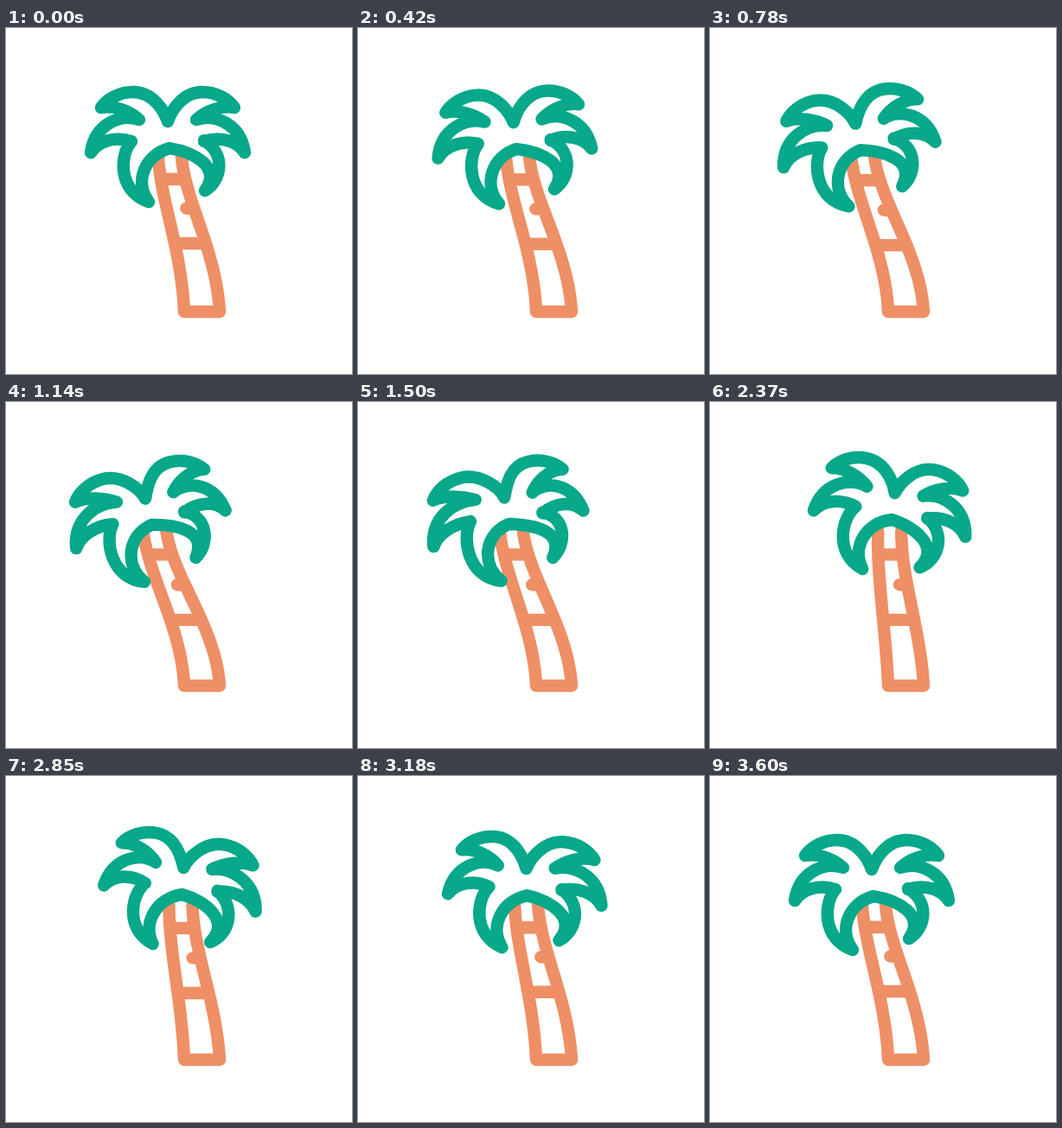
These frames come from a looping animation (400x400 px, 5630 ms). An HTML page:

```html
<!DOCTYPE html>
<html lang="en">
<head>
<meta charset="utf-8">
<title>Palm in the wind</title>
<style>
  html, body { margin: 0; width: 100%; height: 100%; overflow: hidden; background: #fff; }
  svg { display: block; width: 100%; height: 100%; }
  path { fill: none; stroke-width: 14.4; stroke-linecap: round; stroke-linejoin: round; }
</style>
</head>
<body>
<svg viewBox="0 0 400 400">
  <path id="trunk" stroke="#ee8f66"/>
  <path id="crown" stroke="#08a88a"/>
</svg>
<script>
const LOOP = 5630, SWAY = 3600, STEP = 30;
const APEX = [189, 139], AXIS = 187;
const trunk = document.getElementById('trunk');
const crown = document.getElementById('crown');

const mapPoints = (d, f) => d.replace(/(\d+) (\d+)/g, (_, x, y) =>
  f(+x, +y).map(v => v.toFixed(2)).join(' '));

// The two upper leaves are mirrored; the hanging pair is not
const leaves = `M187 108C183 96 170 74 147 74C131 74 117 82 110 92
  C125 89 143 96 154 106C133 99 103 110 98 144C107 130 127 125 145 131`;
const hanging = `M145 131C132 145 128 188 165 201C148 178 160 147 189 139
  C215 143 251 160 230 188C250 176 254 145 229 130`;
const palm = leaves + mapPoints(leaves, (x, y) => [2 * AXIS - x, y])
  .replace(/\.00/g, '') + hanging;

// Smooth motion through values reached at the given times
function ease(t, times, values) {
  let i = 1;
  while (i < times.length - 1 && t > times[i]) i++;
  const u = (t - times[i - 1]) / (times[i] - times[i - 1]);
  return values[i - 1] + (values[i] - values[i - 1]) * u * u * (3 - 2 * u);
}

// Point on a cubic trunk side; the upper two controls follow the wind
function side(xs, u, sway, drop) {
  const v = 1 - u;
  const w = [v * v * v, 3 * v * v * u, 3 * v * u * u, u * u * u];
  const mix = a => a.reduce((sum, n, i) => sum + n * w[i], 0);
  return [mix(xs) + sway * (0.85 * w[0] + 0.65 * w[1]),
    mix([149, 200, 257, 328]) + drop * 4 * u * v];
}

function drawTrunk(sway, drop) {
  const left = u => side([176, 179, 203, 206], u, sway, drop);
  const right = u => side([203, 207, 243, 247], u, sway, drop);
  const line = pts => 'M' + pts.map(p => p.map(v => v.toFixed(2)).join(' ')).join('L');
  const steps = Array.from({ length: 25 }, (_, i) => i / 24);
  const [kx, ky] = right(0.37);
  trunk.setAttribute('d',
    line([...steps.map(left), ...steps.map(right).reverse()]) +
    line([left(0.165), right(0.165)]) +
    line([left(0.6), right(0.6)]) +
    line([[kx - 9, ky], [kx, ky]]));
}

// Leaf bases turn with the trunk, leaf tips lag behind
function drawCrown(sway, tip) {
  const base = 0.45 * sway;
  crown.setAttribute('d', mapPoints(palm, (x, y) => {
    const dx = x - APEX[0], dy = y - APEX[1];
    const k = Math.min(1, Math.max(0, (Math.hypot(dx, dy) - 45) / 22));
    const a = (base + (tip - base) * k) * Math.PI / 180;
    const c = Math.cos(a), s = Math.sin(a);
    return [APEX[0] + sway + dx * c - dy * s,
      APEX[1] - 0.14 * sway + dx * s + dy * c];
  }));
}

function draw(t) {
  const thirds = [0, SWAY / 3, SWAY * 2 / 3, SWAY];
  const sway = ease(t, thirds, [0, -21, 21.5, 0]);
  drawTrunk(sway, ease(t, thirds, [0, 3, 3, 0]));
  drawCrown(sway, ease(t, [0, 1320, 2580, SWAY], [0, -15, 11.8, 0]));
}

const start = performance.now();
function frame() {
  const t = (performance.now() - start) % LOOP;
  draw(Math.min(SWAY, Math.floor(t / STEP) * STEP));
  requestAnimationFrame(frame);
}
frame();
</script>
</body>
</html>
```
